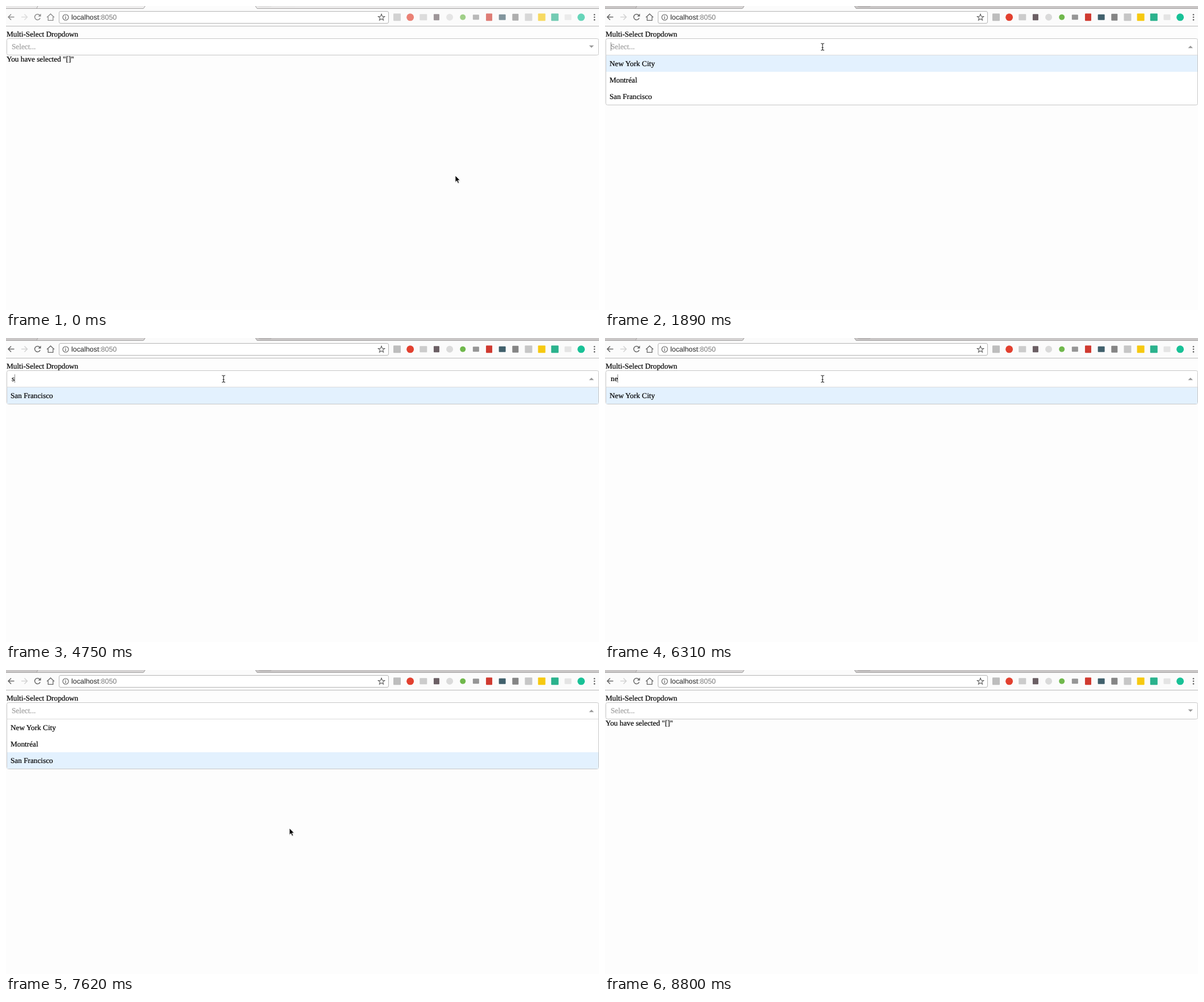
An HTML page that plays this animation: 1044x536 px, repeating every 8910 ms.

```html
<!DOCTYPE html>
<html lang="en">
<head>
<meta charset="utf-8">
<title>Multi-select dropdown</title>
<style>
html, body { margin: 0; width: 100%; height: 100%; overflow: hidden; background: #fdfdfd; }
svg { display: block; width: 1044px; height: 536px; }
text { font: 13.25px "Liberation Serif", "Times New Roman", serif; fill: #000; stroke: #000; stroke-width: .2; white-space: pre; text-rendering: geometricPrecision; }
.url { font: 12.4px "Liberation Sans", Arial, sans-serif; fill: #222; stroke: none; }
#hint { fill: #a6a6a6; stroke: #a6a6a6; stroke-width: .3; }
.line { fill: none; stroke: #666; stroke-width: 1.5; }
</style>
</head>
<body>
<svg viewBox="0 0 1044 536">
  <rect width="1044" height="536" fill="#fdfdfd"/>

  <!-- tab strip and toolbar -->
  <g id="strip">
    <rect width="1044" height="4" fill="#c9c6c6"/>
    <path d="M56 0H244L242 4H54Z" fill="#d6d4d4"/>
    <path d="M245 0H439L442 5H243Z" fill="#fbfbfb"/>
    <path d="M445 0H466Q468 1 465 1.5H449Q446 1 445 0Z" fill="#d9d5d5" stroke="#a5a3a3" stroke-width=".8"/>
  </g>
  <path d="M0 4.5H242L245 0M54 4L56 0M439 0L442 4.5H1044" fill="none" stroke="#a5a3a3"/>
  <rect y="5" width="1044" height="30" fill="#fbfbfb"/>
  <rect y="35" width="1044" height="1" fill="#b9b9b9"/>

  <g id="nav">
    <path class="line" d="M14.5 19.5H4M9 14.5L4 19.5L9 24.5"/>
    <path class="line" d="M27 19.5H37.5M32.5 14.5L37.5 19.5L32.5 24.5" style="stroke:#d2d2d2"/>
    <path class="line" d="M59.6 16.4A5 5 0 1 0 60.2 21.3"/>
    <path d="M61.5 13.5V18.5H56.5Z" fill="#666"/>
    <path class="line" d="M72 20L78.5 14L85 20M74.2 19V25.3H82.8V19" style="stroke-width:1.3"/>
  </g>
  <rect x="93.5" y="9.5" width="580" height="21" rx="2.5" fill="#fff" stroke="#b4b4b4"/>
  <circle cx="105" cy="20" r="5" fill="none" stroke="#555" stroke-width="1.1"/>
  <path d="M105 17V18.3M105 19.2V23" stroke="#555" stroke-width="1.2"/>
  <text class="url" x="115" y="24">localhost<tspan fill="#777">:8050</tspan></text>
  <path id="star" fill="none" stroke="#555" stroke-width="1.1"/>
  <g id="exts"></g>
  <g fill="#666"><circle cx="1036" cy="15.2" r="1.3"/><circle cx="1036" cy="19.8" r="1.3"/><circle cx="1036" cy="24.4" r="1.3"/></g>

  <!-- page -->
  <text x="1" y="53.5">Multi-Select Dropdown</text>
  <text id="result" x="1" y="98">You have selected "[]"</text>
  <g id="menu">
    <path id="panel" fill="#fff" stroke="#c6c6c6"/>
    <rect id="hover" x="2" width="1041" fill="#e3f1fe"/>
    <g id="rows"></g>
  </g>
  <rect id="ring" x="0" y="56" width="1045" height="32" rx="4" fill="none" stroke="#0088cc" stroke-width="2" opacity=".4"/>
  <path id="box" fill="#fff" stroke="#c6c6c6"/>
  <path id="divider" d="M2 86.5H1043" stroke="#dcdcdc"/>
  <path id="toggle" fill="#999"/>
  <text id="hint" x="10" y="76">Select...</text>
  <text id="typed" x="10" y="76"></text>
  <rect id="caret" y="64" width="1" height="15" fill="#000" opacity=".45"/>

  <g id="arrow">
    <path d="M0 2V14L2.7 11.6L4.8 15.6L7.2 14.6L5.2 10.6H8.8Z" fill="#000" opacity=".15"/>
    <path d="M0 1V12.6L2.7 10.1L4.6 14.4L6.6 13.5L4.7 9.3H8.2Z" fill="#000" stroke="#fff" stroke-width=".8"/>
  </g>
  <path id="beam" d="M-3 -6Q0 -6 0 -4.5Q0 -6 3 -6M0 -4.5V4.5M-3 6Q0 6 0 4.5Q0 6 3 6M-1.5 1.5H1.5" fill="none" stroke="#222" stroke-width="1.1"/>
</svg>
<script>
const LOOP = 8910, ROW = 29, MENU_TOP = 87;
const CITIES = ['New York City', 'Montréal', 'San Francisco'];
const ACTIVE = 110, FOCUS = 820, OPEN = 940, LEAVE = 7270, CLOSE = 7970;

// [time, text in the field]
const TYPING = [
  [0, ''], [2480, 'm'], [2710, 'mo'], [2950, 'mon'], [3190, 'mo'], [3430, 'm'], [3550, ''],
  [3910, 's'], [4150, 'sa'], [4270, 'san'], [4630, 'sa'], [4750, 's'], [4870, ''],
  [5230, 'n'], [5350, 'new'], [5710, 'new '], [6070, 'new'], [6310, 'ne'], [6430, 'n'], [6670, '']
];
// [time, x, y]; a missing x means no pointer
const POINTER = [
  [0, 791, 298], [110, 762, 282], [230, 648, 219], [350, 512, 143], [460, 412, 88], [580, 383, 72],
  [7270, 386, 53], [7390, 412, 104], [7500, 452, 190], [7620, 499, 278],
  [7740, 620, 330], [7860, 737, 365], [8210],
  [8450, 1030, 521], [8570, 1033, 523], [8690, 1035, 525], [8800]
];
// [shape, colour, width, height]
const EXTENSIONS = [
  ['sq', '#bdbdbd', 13, 13], ['ci', '#e2402f', 13], ['sq', '#cccccc', 13, 11], ['sq', '#6b5f64', 10, 11],
  ['ci', '#dadada', 12], ['ci', '#70b84c', 10], ['sq', '#969696', 11, 9], ['sq', '#d03a30', 11, 13],
  ['sq', '#40606c', 12, 10], ['sq', '#858585', 11, 12], ['sq', '#c6c6c6', 13, 13], ['sq', '#f6c911', 13, 13],
  ['sq', '#2bb28d', 13, 13], ['sq', '#e4e4e4', 12, 10], ['ci', '#18c196', 13]
];

const $ = id => document.getElementById(id);
const el = {};
for (const id of ['strip', 'nav', 'exts', 'result', 'menu', 'panel', 'hover', 'rows', 'ring', 'box',
  'divider', 'toggle', 'hint', 'typed', 'caret', 'arrow', 'beam']) el[id] = $(id);

function add(parent, tag, attrs) {
  const node = document.createElementNS('http://www.w3.org/2000/svg', tag);
  for (const key in attrs) node.setAttribute(key, attrs[key]);
  return parent.appendChild(node);
}
const show = (node, on) => node.setAttribute('visibility', on ? 'visible' : 'hidden');
const at = (list, t) => list.reduce((last, item) => item[0] <= t ? item : last);

EXTENSIONS.forEach(([kind, fill, width, height], i) => {
  const x = 688.5 + i * 23.15, y = 19.8;
  if (kind === 'ci') add(el.exts, 'circle', { cx: x, cy: y, r: width / 2, fill });
  else add(el.exts, 'rect', { x: x - width / 2, y: y - height / 2, width, height, rx: 1, fill });
});

const points = Array.from({ length: 10 }, (_, i) => {
  const r = i % 2 ? 2.6 : 6, a = i * Math.PI / 5;
  return (661 + r * Math.sin(a)).toFixed(2) + ' ' + (20.3 - r * Math.cos(a)).toFixed(2);
});
$('star').setAttribute('d', 'M' + points.join('L') + 'Z');

const labels = CITIES.map(() => add(el.rows, 'text', { x: 8 }));

function drawMenu(open, text, pointer) {
  show(el.menu, open);
  show(el.divider, open);
  show(el.result, !open);
  el.box.setAttribute('d', open
    ? 'M1.5 86.5V60.5Q1.5 57.5 4.5 57.5H1040.5Q1043.5 57.5 1043.5 60.5V86.5Z'
    : 'M4.5 57.5H1040.5Q1043.5 57.5 1043.5 60.5V83.5Q1043.5 86.5 1040.5 86.5H4.5Q1.5 86.5 1.5 83.5V60.5Q1.5 57.5 4.5 57.5Z');
  el.toggle.setAttribute('d', open ? 'M1026.5 74.3H1035L1030.75 70Z' : 'M1026.5 69.5H1035L1030.75 73.8Z');

  const found = CITIES.filter(c => c.toLowerCase().includes(text.trim()));
  const end = MENU_TOP + found.length * ROW;
  el.panel.setAttribute('d',
    `M1.5 86.5V${end - 2.5}Q1.5 ${end + .5} 4.5 ${end + .5}H1040.5Q1043.5 ${end + .5} 1043.5 ${end - 2.5}V86.5`);
  labels.forEach((label, i) => {
    label.textContent = found[i] || '';
    label.setAttribute('y', MENU_TOP + 18.5 + i * ROW);
  });
  const under = Math.floor((pointer[2] - MENU_TOP) / ROW);
  const row = pointer[0] < LEAVE ? 0 : Math.min(2, Math.max(0, under));
  el.hover.setAttribute('y', MENU_TOP + row * ROW);
  el.hover.setAttribute('height', ROW);
}

function drawField(t, text) {
  el.typed.textContent = text;
  show(el.hint, !text);
  show(el.ring, t >= FOCUS && t < OPEN);
  const width = text ? el.typed.getComputedTextLength() : 0;
  el.caret.setAttribute('x', Math.floor(10 + width));
  show(el.caret, t >= OPEN && t < LEAVE && !(t >= 1410 && t < 1890));
}

function drawPointer([, x, y]) {
  const there = x !== undefined, inField = there && y > 57 && y < 86;
  show(el.beam, inField);
  show(el.arrow, there && !inField);
  if (there) (inField ? el.beam : el.arrow).setAttribute('transform', `translate(${x} ${y})`);
}

// the browser window is paler until it becomes active
function drawChrome(active) {
  el.strip.setAttribute('opacity', active ? 1 : .35);
  el.nav.setAttribute('opacity', active ? 1 : .75);
  el.exts.setAttribute('opacity', active ? 1 : .65);
}

function draw(t) {
  const text = at(TYPING, t)[1], pointer = at(POINTER, t);
  drawChrome(t >= ACTIVE);
  drawMenu(t >= OPEN && t < CLOSE, text, pointer);
  drawField(t, text);
  drawPointer(pointer);
}

const start = performance.now();
function tick() {
  draw((performance.now() - start) % LOOP);
  requestAnimationFrame(tick);
}
tick();
</script>
</body>
</html>
```
